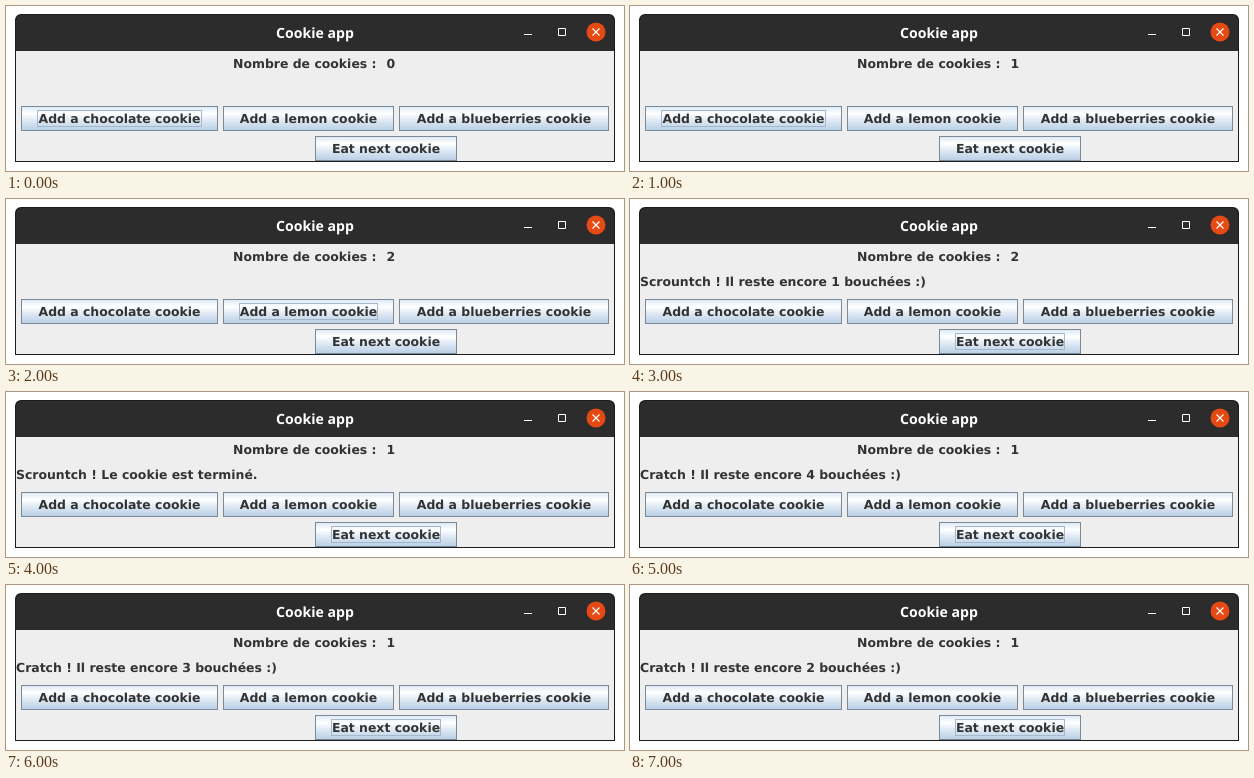
Recreate the animation shown at these times as an HTML page. Size 618 px wide and 165 px high, loop 8 s.

```html
<!DOCTYPE html>
<html lang="fr">
<head>
<meta charset="utf-8">
<title>Cookie app</title>
<style>
  html, body { margin: 0; width: 100%; height: 100%; overflow: hidden; background: #fff; }
  svg { display: block; }
  text { font: bold 12.45px "DejaVu Sans", sans-serif; fill: #333; white-space: pre; text-rendering: geometricPrecision; }
  .title { font: bold 14.1px "Open Sans", sans-serif; fill: #fff; }
  .button { fill: url(#ocean); stroke: #7a8a99; }
  .focus { fill: none; stroke: #a3b8cc; }
</style>
</head>
<body>
<svg id="stage" width="618" height="165" viewBox="0 0 618 165">
  <defs>
    <linearGradient id="ocean" x2="0" y2="1">
      <stop stop-color="#dde8f3"/>
      <stop offset=".3" stop-color="#fff"/>
      <stop offset=".6" stop-color="#dde8f3"/>
      <stop offset="1" stop-color="#b8cfe5"/>
    </linearGradient>
  </defs>
  <path d="M9 156V14a6 6 0 0 1 6-6H603a6 6 0 0 1 6 6V156Z" fill="#1c1c1c"/>
  <path d="M10 45V15a6 6 0 0 1 6-6H602a6 6 0 0 1 6 6V45Z" fill="#2c2c2c"/>
  <path d="M10 45H608V155H10Z" fill="#eee"/>
  <text class="title" x="309" y="32" text-anchor="middle">Cookie app</text>
  <path d="M518 28.5h8M552.5 22.5h7v7h-7Z" fill="none" stroke="#fff"/>
  <circle cx="590" cy="26" r="9.5" fill="#e64a14"/>
  <path d="M586.5 22.5l7 7m0-7l-7 7" stroke="#fff" stroke-width="1.2"/>
  <text x="227" y="62">Nombre de cookies :</text>
  <text id="count" x="380.5" y="62"></text>
  <text id="message" x="10" y="87"></text>
</svg>
<script>
const STEP = 1000;
const [CHOCOLATE, LEMON, , EAT] = [0, 1, 2, 3];
const buttons = [
  ["Add a chocolate cookie", 15, 100, 197],
  ["Add a lemon cookie", 217, 100, 171],
  ["Add a blueberries cookie", 393, 100, 210],
  ["Eat next cookie", 309, 130, 142],
];
const left = (sound, bites) => `${sound} ! Il reste encore ${bites} bouchées :)`;
const states = [
  [0, CHOCOLATE, ""],
  [1, CHOCOLATE, ""],
  [2, LEMON, ""],
  [2, EAT, left("Scrountch", 1)],
  [1, EAT, "Scrountch ! Le cookie est terminé."],
  [1, EAT, left("Cratch", 4)],
  [1, EAT, left("Cratch", 3)],
  [1, EAT, left("Cratch", 2)],
];

const stage = document.getElementById("stage");
const count = document.getElementById("count");
const message = document.getElementById("message");

function add(tag, attributes, content = "") {
  const node = document.createElementNS("http://www.w3.org/2000/svg", tag);
  for (const key in attributes) node.setAttribute(key, attributes[key]);
  node.textContent = content;
  return stage.appendChild(node);
}

const focusRings = buttons.map(([label, x, y, width]) => {
  add("rect", { class: "button", x: x + .5, y: y + .5, width: width - 1, height: 24 });
  const ring = add("rect", { class: "focus", x: x + 16.5, y: y + 4.5, width: width - 33, height: 16 });
  add("text", { x: x + width / 2, y: y + 17, "text-anchor": "middle" }, label);
  return ring;
});

function draw() {
  const index = Math.floor(performance.now() / STEP) % states.length;
  const [cookies, focused, words] = states[index];
  count.textContent = cookies;
  message.textContent = words;
  focusRings.forEach((ring, i) => ring.setAttribute("visibility", i === focused ? "visible" : "hidden"));
  requestAnimationFrame(draw);
}
draw();
</script>
</body>
</html>
```
